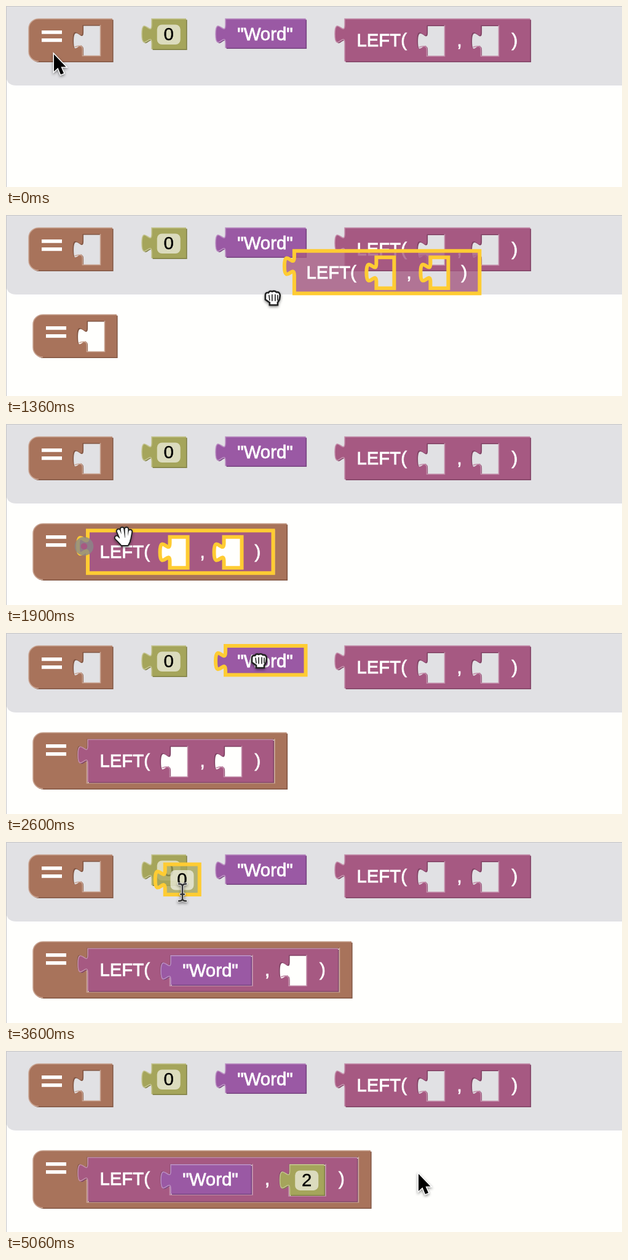
An HTML page for the animation above (5760 ms loop, 1002 by 296 pixels).

```html
<!DOCTYPE html>
<html lang="en">
<head>
<meta charset="utf-8">
<title>Building a formula from blocks</title>
<style>
  html, body { margin: 0; width: 100%; height: 100%; overflow: hidden; background: #fffffd; }
  svg { display: block; width: 1002px; height: 296px; }
  text { font: 29.33px "Liberation Sans", Arial, sans-serif; fill: #fff; stroke: #fff; stroke-width: .8px; white-space: pre; }
  .value { fill: #000; stroke: #000; stroke-width: .4px; text-anchor: middle; }
  .light { fill: none; stroke-width: 1.6; }
  .mark { fill: none; stroke: #fc3; stroke-width: 8; }
  .ripple { fill: none; stroke: #888; stroke-width: 10; }
  .line { fill: none; stroke-linecap: round; stroke-linejoin: round; }
  .cursor { filter: drop-shadow(0 2px 2px rgba(0, 0, 0, .45)); }
</style>
</head>
<body>
<svg viewBox="0 0 1002 296">
  <rect width="1002" height="296" fill="#fffffd"/>
  <path d="M0 0H1002V130H17Q0 130 0 113Z" fill="#e1e1e4"/>
  <path d="M.5 296V.5H1002" fill="none" stroke="#c4c4c6"/>
  <g id="toolbox"></g>
  <g id="work"></g>
</svg>
<script>
const LOOP = 5760;
const LAG = 35; // a dragged block trails the pointer by this many ms
const TAB_DOWN = 'c0 20-16-16-16 15s16-5 16 15';
const TAB_UP = 'c0-20-16 16-16-15s16 5 16-15';

const COLORS = {
  eq:   { fill: '#a8735b', light: '#c9a593', dark: '#825744' },
  num:  { fill: '#a5a55b', light: '#c3c38f', dark: '#7f7f45' },
  word: { fill: '#9a59a4', light: '#bb8fc2', dark: '#774580' },
  left: { fill: '#a65982', light: '#c48fab', dark: '#804465' }
};
const HOME = { eq: [37, 21], num: [237, 21], word: [357, 21], left: [551, 21] };

// press: copy appears; grab to drop: dragging; blur: selection ends
const MOVES = [
  { kind: 'eq', press: 60, grab: 300, drop: 600, blur: 1210 },
  { kind: 'left', press: 1210, grab: 1250, drop: 1870, blur: 2440, seat: [133, 174] },
  { kind: 'word', press: 2440, grab: 2600, drop: 2890, blur: 3450, seat: [268, 186] },
  { kind: 'num', press: 3450, grab: 3500, drop: 4040, blur: 4830, seat: [462, 186] }
];
const TYPED = 4560, LEAVE = 4800;

const speedUp = s => s * s;
const slowDown = s => s * (2 - s);
const smooth = s => s * s * (3 - 2 * s);

// Pointer glides: from, until, x, y, easing
const START = [78, 79];
const GLIDES = [
  [30, 60, 75, 55, smooth],
  [300, 460, 82, 197, smooth],
  [800, 1200, 607, 56, smooth],
  [1250, 1360, 435, 135, speedUp],
  [1360, 1780, 192, 184, slowDown],
  [2000, 2400, 412, 45, smooth],
  [2600, 2850, 323, 210, smooth],
  [3200, 3420, 240, 49, smooth],
  [3500, 3850, 473, 215, smooth],
  [4040, 4200, 490, 220, smooth],
  [LEAVE, 5060, 671, 201, smooth]
];

function pointer(t) {
  let [x, y] = START;
  for (const [from, until, toX, toY, ease] of GLIDES) {
    if (t <= from) break;
    const k = ease(Math.min(1, (t - from) / (until - from)));
    x += (toX - x) * k;
    y += (toY - y) * k;
  }
  return [x, y];
}

function dragged(m, t) {
  const [x0, y0] = pointer(m.grab);
  const [x, y] = pointer(Math.max(m.grab, Math.min(t, m.drop) - LAG));
  const [hx, hy] = HOME[m.kind];
  return { x: hx + x - x0, y: hy + y - y0 };
}

const label = (x, y, s, cls = '') => `<text class="${cls}" x="${x}" y="${y}">${s}</text>`;

function socket(x, y, child) {
  const size = child ? layout(child) : { w: 25, h: 47.5 };
  return { x, y, child, w: size.w + 4, h: size.h + 3 };
}

// Size, sockets and face of a block
function layout({ kind, kids = [], value = '0' }) {
  if (kind === 'num') {
    return { w: 56, h: 49.5, holes: [],
      face: '<rect x="8.7" y="9.5" width="38" height="32.5" rx="8" fill="#fff" fill-opacity=".6"/>' +
        label(27.7, 35, value, 'value') };
  }
  if (kind === 'word') return { w: 130.5, h: 47.5, holes: [], face: label(19.3, 34.5, '"Word"') };
  if (kind === 'eq') {
    const s = socket(87.5, 10, kids[0]);
    return { w: s.x + s.w + 19.5, h: s.h + 19, holes: [s],
      face: '<path d="M21 19h33v5.7H21zM21 32h33v5.7H21z" fill="#fff"/>' };
  }
  const a = socket(133.5, 10.5, kids[0]), endA = a.x + a.w;
  const b = socket(endA + 59, 10.5, kids[1]), endB = b.x + b.w;
  return { w: endB + 51, h: Math.max(a.h, b.h) + 19, holes: [a, b],
    face: label(19.5, 45, 'LEFT(') + label(endA + 20, 45, ',') + label(endB + 21, 45, ')') };
}

function drawBlock(b) {
  const { w, h, holes, face } = layout(b);
  const c = COLORS[b.kind];
  const edge = b.kind === 'eq'
    ? `M16 ${h}A16 16 0 0 1 0 ${h - 16}V16A16 16 0 0 1 16 0H${w}`
    : `M0 ${h}V40${TAB_UP}V0H${w}`;
  const outline = edge + `V${h}Z` + holes.map(s =>
    `M${s.x} ${s.y}v10${TAB_DOWN}V${s.y + s.h}h${s.w}V${s.y}Z`).join('');
  const shine = edge + holes.map(s =>
    `M${s.x - 13} ${s.y + 36}Q${s.x} ${s.y + 31} ${s.x} ${s.y + 40}V${s.y + s.h}h${s.w}V${s.y}`).join('');
  const body = (fill, extra = '') => `<path d="${outline}" fill="${fill}" fill-rule="evenodd" ${extra}/>`;
  const shape = b.sel
    ? body(c.fill, `fill-opacity="${b.drag ? .8 : 1}" stroke="#fc3" stroke-width="6"`)
    : body(c.dark, 'transform="translate(1.6 1.6)"') + body(c.fill) +
      `<path class="light" d="${shine}" stroke="${c.light}"/>`;
  const inner = holes.filter(s => s.child)
    .map(s => drawBlock({ ...s.child, x: s.x + 1.5, y: s.y + 1.2 })).join('');
  return `<g transform="translate(${b.x} ${b.y})">${shape}${face}${inner}</g>`;
}

const stroke = (d, color, width) => `<path class="line" d="${d}" stroke="${color}" stroke-width="${width}"/>`;
const FINGERS = 'M-9-9L-4 3M-3-12L-1 3M4-12L4 3M10-8L8 3M-12 2L-5 9';
const PALM = 'M-7 2H10L9 8 6 14H-4L-8 9Z';
const BEAM = 'M-6-14Q0-14 0-10Q0-14 6-14M0-10V10M-6 14Q0 14 0 10Q0 14 6 14M-3 3H3';
const CURSORS = {
  none: '',
  arrow: '<path d="M0 0V28L6.500 22 11 33 16 31 11.500 20.500H19.500Z" stroke="#fff" stroke-width="3" paint-order="stroke"/>',
  hand: stroke(FINGERS, '#222', 8.5) + stroke(PALM, '#222', 4) + stroke(FINGERS, '#fff', 4.6) +
    `<path d="${PALM}" fill="#fff"/>`,
  fist: '<path d="M-12-4Q-12-9-7-8Q-5-12-1-10Q3-12 6-9Q11-10 12-4L11 3 8 8V12H-5V8L-12 3Z" fill="#fff" stroke="#222" stroke-width="2.6"/>' +
    stroke('M-6-4L-5 4M-1-5V5M4-5V5M8-4V4', '#222', 1.6),
  beam: stroke(BEAM, '#eee', 4.5) + stroke(BEAM, '#333', 2.5)
};

function look(t) {
  if (t < MOVES[0].press || t >= LEAVE) return 'arrow';
  if (t >= TYPED) return 'none';
  if (t >= MOVES[3].press) return 'beam';
  return MOVES.some(m => t >= m.press && t < m.drop) ? 'fist' : 'hand';
}

function joinEffects({ seat, drop }, t) {
  if (!seat) return '';
  const [x, y] = seat, p = (t - drop) / 150;
  if (p < -1 || p >= 1) return '';
  return p < 0
    ? `<path class="mark" d="M${x - 1} ${y - 1}v10${TAB_DOWN}v10"/>`
    : `<circle class="ripple" cx="${x - 6}" cy="${y + 26}" r="${50 * p}" opacity="${1 - p}"/>`;
}

function drawWork(t) {
  const loose = [];
  let parent = null, effects = '';
  for (const m of MOVES) {
    if (t < m.press) break;
    const b = { kind: m.kind, ...dragged(m, t), kids: [], sel: t < m.blur, drag: t >= m.grab && t < m.drop };
    if (m.kind === 'num' && t >= TYPED) b.value = '2';
    if (parent && t >= m.drop) parent.kids.push(b);
    else loose.push(b);
    if (m.kind === 'eq' || m.kind === 'left') parent = b;
    effects += joinEffects(m, t);
  }
  const [base, ...rest] = loose.map(drawBlock);
  return (base || '') + effects + rest.join('') +
    `<g class="cursor" transform="translate(${pointer(t)})">${CURSORS[look(t)]}</g>`;
}

const work = document.getElementById('work');
document.getElementById('toolbox').innerHTML =
  Object.entries(HOME).map(([kind, [x, y]]) => drawBlock({ kind, x, y })).join('');

const start = performance.now();
let shown = '';
function tick() {
  const markup = drawWork((performance.now() - start) % LOOP);
  if (markup !== shown) work.innerHTML = shown = markup;
  requestAnimationFrame(tick);
}
tick();
</script>
</body>
</html>
```
